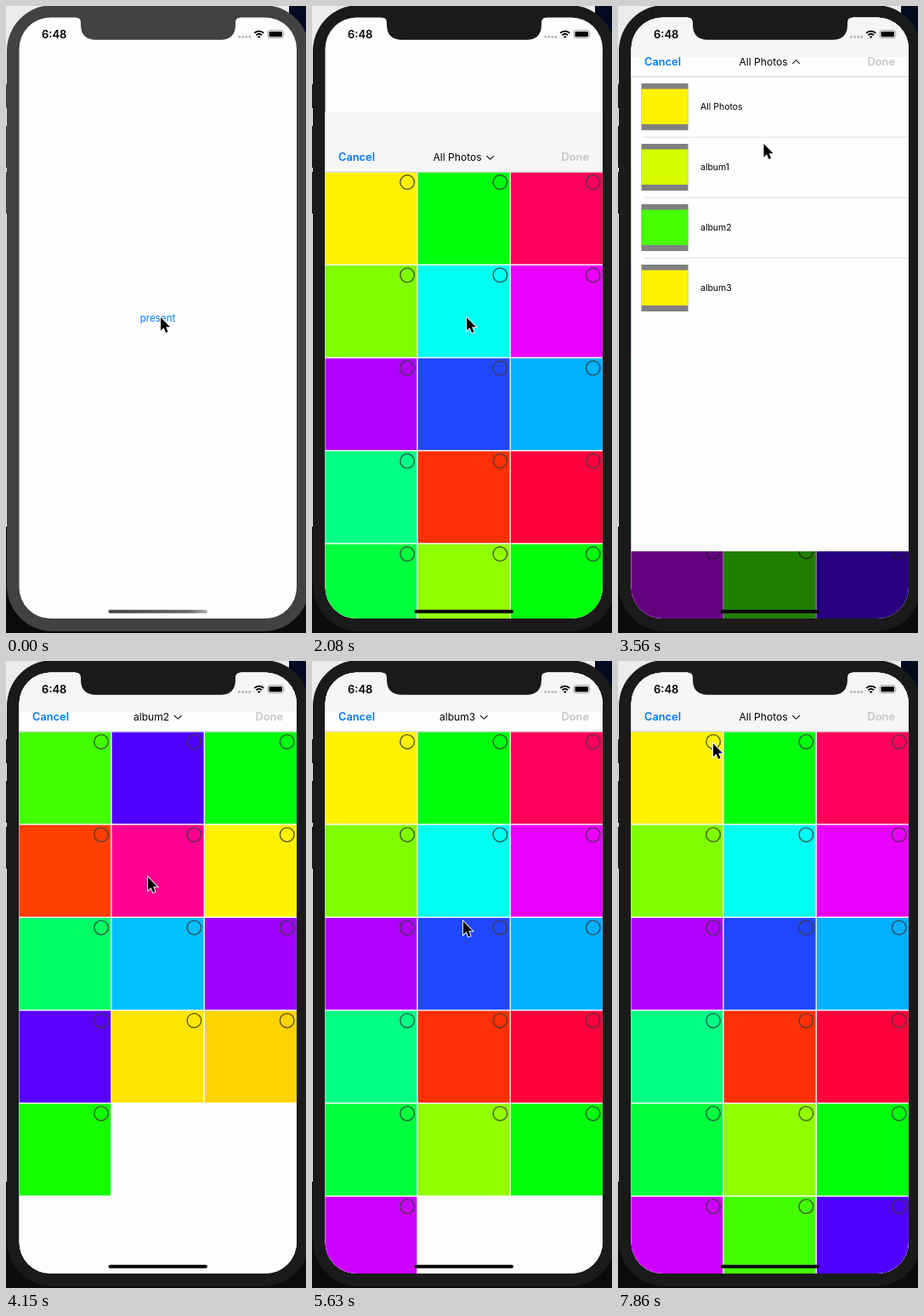
Write an HTML page that moves like this. It is 353 px wide and 737 px high and loops after 8000 ms.

```html
<!DOCTYPE html>
<html lang="en">
<head>
<meta charset="utf-8">
<title>Photo picker</title>
<style>
  html, body { margin: 0; width: 100%; height: 100%; overflow: hidden; background: #0c0a0b; }
  svg { display: block; width: 353px; height: 737px; font-family: Inter, Roboto, sans-serif; }
  .bold { font-weight: 600; font-size: 12.8px; }
  .title { font-size: 12.1px; }
  .label { font-size: 10.5px; }
  .ring { fill: none; stroke: #3c3c3c; stroke-opacity: .85; stroke-width: 1.4; }
</style>
</head>
<body>
<svg viewBox="0 0 353 737">
  <defs>
    <clipPath id="screen"><rect x="15.5" y="13.5" width="326.5" height="706.5" rx="37"/></clipPath>
    <linearGradient id="fade"><stop stop-color="#444"/><stop offset=".8" stop-color="#666"/><stop offset="1" stop-color="#aaa"/></linearGradient>
  </defs>

  <!-- desktop behind the phone -->
  <rect width="333" height="612" fill="#ececec"/>
  <rect x="333" width="20" height="612" fill="#030a20"/>
  <g class="bezel">
    <rect x="1" y="-1" width="356" height="736" rx="54"/>
    <path d="M0 92h2v28h-2zM0 141h2v49h-2zM0 195h2v49h-2z"/>
  </g>

  <g clip-path="url(#screen)">
    <rect x="15" y="13" width="328" height="708" fill="#fefefe"/>
    <text id="present" x="178.5" y="371" text-anchor="middle" font-size="11.6" fill="#007aff">present</text>
    <g id="sheet">
      <rect x="15" y="13" width="328" height="708" fill="#fdfdfd"/>
      <g id="grid"></g>
      <g id="menu">
        <rect x="15" y="83" width="328" height="638" opacity=".5"/>
        <rect x="15" y="83" width="328" height="558" fill="#fefefe"/>
        <g id="rows"></g>
      </g>
      <rect x="15" y="13" width="328" height="70" fill="#f6f6f6"/>
      <rect id="strip" x="15" y="60" width="328" height="23" fill="#fefefe"/>
      <path d="M15 83h328" stroke="#c4c4c6" stroke-width=".9"/>
      <text class="bold" x="31" y="70.3" fill="#007aff">Cancel</text>
      <text class="bold" x="326" y="70.3" text-anchor="end" fill="#c6c6c8">Done</text>
      <text id="title" class="title" y="70"></text>
      <path id="chevron" fill="none" stroke="#111" stroke-width="1.1"/>
    </g>
    <text class="bold" x="42" y="38" style="font-size:13px">6:48</text>
    <g fill="#b8b8b8">
      <circle cx="274.5" cy="36.2" r="1.5"/><circle cx="278.7" cy="36.2" r="1.5"/>
      <circle cx="282.8" cy="36.2" r="1.5"/><circle cx="286.8" cy="36.2" r="1.5"/>
    </g>
    <path d="M292.2 31.8a8 8 0 0 1 11 0M294.4 34.2a5 5 0 0 1 6.6 0" fill="none" stroke="#000" stroke-width="1.8"/>
    <path d="M295.9 36a2.6 2.6 0 0 1 3.6 0L297.7 38z"/>
    <rect x="308" y="28.5" width="18.5" height="9.2" rx="2.6" fill="none" stroke="#999" stroke-width=".9"/>
    <rect x="309.5" y="30" width="15.5" height="6.2" rx="1.2"/>
    <path d="M327.6 31.4q1.4 1.6 0 3.4z" fill="#999"/>
    <rect id="home" x="120.5" y="709.7" width="116.5" height="4" rx="2"/>
  </g>
  <path class="bezel" d="M82 12V13.5Q88 13.5 88 19.5V22Q88 39.7 106 39.7H252Q270 39.7 270 22V19.5Q270 13.5 276 13.5V12z"/>
  <path id="cursor" d="M0 0V15.6L3.6 12.3 6 18 8.6 16.9 6.2 11.3H11z" stroke="#fff" stroke-width="1.8" paint-order="stroke"/>
</svg>

<script>
const LOOP = 8000, TICK = 148;
const $ = id => document.getElementById(id);
const show = (el, on) => el.style.display = on ? '' : 'none';

const photos = ('fff200 00ff0d ff005a 80ff00 00fff2 ea00ff b000ff 2046ff 00b0ff 00ff84 ff3005 ff003c ' +
  '00ff3c 90ff00 00ff0a cc00ff 42ff00 5000ff 00ff0d ff4000 ff0090 fff200 00ff66 00c0ff ' +
  'a000ff 5a00ff ffe600 ffd200 14ff00').split(' ');

const albums = {
  'All Photos': { items: photos.slice(0, 18), x: 142.5, cover: 'fff200' },
  album1: { items: [], x: 150, cover: 'd8ff00' },
  album2: { items: photos.slice(16), x: 150, cover: '46ff00' },
  album3: { items: photos.slice(0, 16), x: 150, cover: 'fff200' }
};
const names = Object.keys(albums);

$('rows').innerHTML = names.map((name, i) => {
  const y = 83.3 + 71 * i;
  return `<rect class="row" x="15" y="${y}" width="328" height="70.5" fill="#d1d1d6"/>
    <rect x="27.5" y="${y + 7.7}" width="55" height="55" fill="#808080"/>
    <rect x="27.5" y="${y + 14.2}" width="55" height="41.5" fill="#${albums[name].cover}"/>
    <text class="label" x="97" y="${y + 39}">${name}</text>` +
    (i < 3 ? `<path d="M31 ${y + 70.9}h312" stroke="#d4d4d6" stroke-width=".8"/>` : '');
}).join('');
const rows = document.querySelectorAll('.row');

let current;
function setAlbum(name) {
  if (name === current) return;
  current = name;
  $('grid').innerHTML = albums[name].items.map((color, i) => {
    const x = 15.3 + 109.3 * (i % 3), y = 83.5 + 109.25 * Math.floor(i / 3);
    return `<rect x="${x}" y="${y}" width="108" height="107.8" fill="#${color}"/>
      <circle class="ring" cx="${x + 96.8}" cy="${y + 11.4}" r="8.3"/>`;
  }).join('');
  $('title').textContent = name;
  $('title').setAttribute('x', albums[name].x);
}

// menu visits: [opens, row pressed, closes, chosen row], in ticks
const visits = [[21, 27, 28, 2], [31, 37, 38, 3], [42, 48, 49, 0]];

// pointer path: [tick, x, y]
const path = [[0, 182, 366], [17, 182, 366], [18, 180, 205], [19, 177, 48], [20, 176, 74], [22, 176, 74],
  [26, 167, 250], [28, 167, 254], [30, 174, 67], [31, 174, 67], [36, 178, 309], [38, 178, 306],
  [39, 167, 160], [40, 160, 57], [42, 160, 57], [47, 171, 108], [48, 171, 108], [49, 171, 113], [53, 112, 97], [54, 112, 97]];

function pointer(k) {
  const i = path.findIndex(p => p[0] > k);
  const [k0, x0, y0] = path[i - 1], [k1, x1, y1] = path[i];
  const f = (k - k0) / (k1 - k0);
  return [x0 + (x1 - x0) * f, y0 + (y1 - y0) * f];
}

function draw(k) {
  const active = k >= 10;
  document.querySelectorAll('.bezel').forEach(el => el.setAttribute('fill', active ? '#1a1a1a' : '#424242'));
  $('home').setAttribute('fill', active ? '#000' : 'url(#fade)');
  $('present').setAttribute('opacity', k === 11 ? .2 : k === 12 ? .6 : 1);

  // sheet slides up on a critically damped spring
  const u = Math.max(0, (k - 12.75) * 2.64);
  $('sheet').setAttribute('transform', `translate(0 ${707 * (1 + u) * Math.exp(-u)})`);
  show($('sheet'), k >= 13);

  const chosen = visits.filter(v => k >= v[2]).pop();
  const visit = visits.find(v => k >= v[0] && k < v[2]);
  setAlbum(names[chosen ? chosen[3] : 0]);
  show($('menu'), visit);
  rows.forEach((row, i) => show(row, visit && k >= visit[1] && i === visit[3]));
  show($('strip'), k >= 23 && k < 42);

  const cx = current === names[0] ? 205.3 : 198;
  $('chevron').setAttribute('d', visit ? `M${cx} 67.8l4.3-4.1 4.3 4.1` : `M${cx} 64l4.3 4.1 4.3-4.1`);
  $('cursor').setAttribute('transform', `translate(${pointer(k)})`);
}

const start = performance.now();
function frame() {
  const t = (performance.now() - start) % LOOP;
  draw(Math.min(53, Math.floor(t / TICK)));
  requestAnimationFrame(frame);
}
frame();
</script>
</body>
</html>
```
